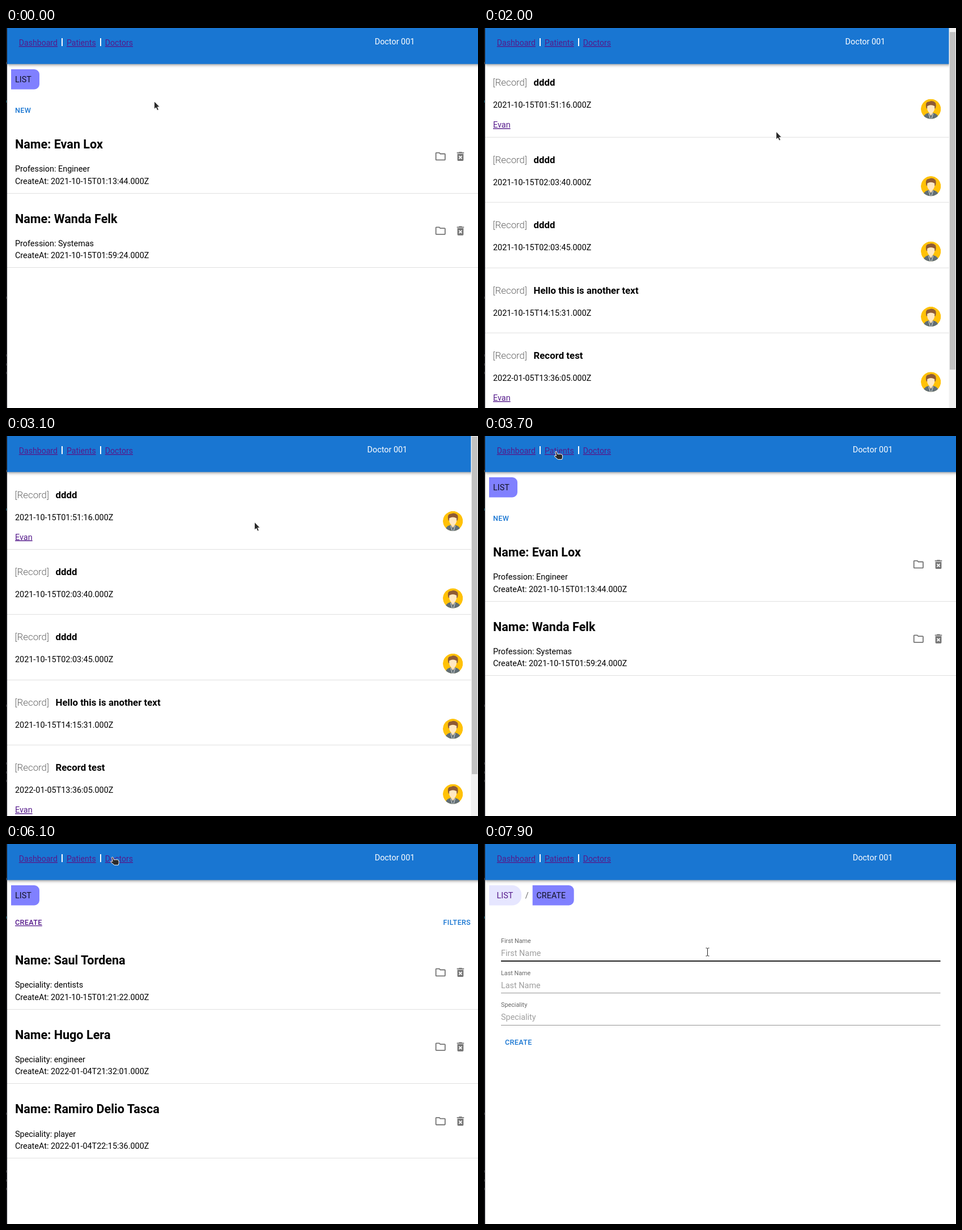
An HTML page for the animation above (8000 ms loop, 833 by 672 pixels).

```html
<!DOCTYPE html>
<html lang="en">
<head>
<meta charset="utf-8">
<title>Clinic admin</title>
<style>
  html, body { margin: 0; width: 100%; height: 100%; overflow: hidden; background: #fff; }
  svg { display: block; width: 833px; height: 672px; }
  text { font: 14.4px Roboto, sans-serif; white-space: pre; }
  .nav { font-size: 14.1px; fill: #551a8b; text-decoration: underline; }
  .link { fill: #551a8b; text-decoration: underline; }
  .crumb { fill: #551a8b; }
  .slash { fill: rgba(0,0,0,.6); }
  .user { fill: #fff; }
  .h2 { font-size: 21.6px; font-weight: 700; }
  .h3 { font-size: 16.85px; font-weight: 700; }
  .tag { font-size: 16.85px; font-weight: 300; fill: #666; }
  .btn { font-size: 12.6px; font-weight: 500; letter-spacing: .02857em; fill: #1976d2; }
  .visited { fill: #551a8b; text-decoration: underline; }
  .label { font-size: 10.8px; fill: rgba(0,0,0,.6); }
  .hint { fill: rgba(0,0,0,.38); }
  .chip { fill: rgba(0,0,0,.87); }
  .icon { fill: rgba(0,0,0,.54); }
  .bar { fill: #1976d2; filter: drop-shadow(0 2px 2px rgba(0,0,0,.28)) drop-shadow(0 1px 3px rgba(0,0,0,.14)); }
  .cursor path { fill: #2a2a2a; stroke: #fff; stroke-width: 1; stroke-linejoin: round; }
  .cursor .halo { stroke-width: 3; stroke-opacity: .6; }
  .cursor .beam { fill: none; stroke: #222; }
</style>
</head>
<body>
<svg id="stage" viewBox="0 0 833 672"></svg>
<script>
const text = (x, y, s, cls = '', id = '') => `<text x="${x}" y="${y}" class="${cls}" id="${id}">${s}</text>`;
const rect = (x, y, w, h, fill, more = '') =>
  `<rect x="${x}" y="${y}" width="${w}" height="${h}" fill="${fill}" ${more}/>`;
const rule = y => rect(2, y, 831, 1, '#e0e0e0');
const group = (id, body) => `<g id="${id}">${body}</g>`;

// Chip with square left corners and rounded right ones
const chip = (x, w, r, fill) =>
  `<path fill="${fill}" d="M${x} 73h${w - r}a${r} ${r} 0 0 1 ${r} ${r}v${35.5 - 2 * r}a${r} ${r} 0 0 1 ${-r} ${r}h${r - w}z"/>`;

const FOLDER = 'M9.17 6l2 2H20v10H4V6h5.17M10 4H4c-1.1 0-2 .9-2 2v12c0 1.1.9 2 2 2h16c1.1 0 2-.9 2-2V8c0-1.1-.9-2-2-2h-8l-2-2z';
const TRASH = 'M6 19c0 1.1.9 2 2 2h8c1.1 0 2-.9 2-2V7H6v12zm2.46-7.12l1.41-1.41L12 12.59l2.12-2.12 1.41 1.41L13.41 14l2.12 2.12-1.41 1.41L12 15.41l-2.12 2.12-1.41-1.41L10.59 14l-2.13-2.12zM15.5 4l-1-1h-5l-1 1H5v2h14V4z';
const icon = (x, y, d) => `<path class="icon" transform="translate(${x} ${y}) scale(.9)" d="${d}"/>`;

const person = ([name, job, date], i) => {
  const y = 161 + i * 131.6;
  return text(16, y + 52, 'Name: ' + name, 'h2') + text(16, y + 93.3, job) +
    text(16, y + 114.7, 'CreateAt: ' + date) +
    icon(756, y + 55.2, FOLDER) + icon(791.2, y + 55.2, TRASH) + rule(Math.floor(y + 131));
};

const listChip = chip(9, 50, 9, '#8080ff') + text(16, 95.5, 'LIST', 'chip');

const patients = listChip + text(16, 150, 'NEW', 'btn') + [
  ['Evan Lox', 'Profession: Engineer', '2021-10-15T01:13:44.000Z'],
  ['Wanda Felk', 'Profession: Systemas', '2021-10-15T01:59:24.000Z']
].map(person).join('');

const doctors = listChip + text(16, 143, 'CREATE', 'btn visited') + text(771.5, 143, 'FILTERS', 'btn') + [
  ['Saul Tordena', 'Speciality: dentists', '2021-10-15T01:21:22.000Z'],
  ['Hugo Lera', 'Speciality: engineer', '2022-01-04T21:32:01.000Z'],
  ['Ramiro Delio Tasca', 'Speciality: player', '2022-01-04T22:15:36.000Z']
].map(person).join('');

const avatar = y => `<g transform="translate(788.7 ${y})" clip-path="url(#disc)">
  <circle r="17.7" fill="#ffc107"/>
  <path fill="#616e75" d="M-14 18Q-13 9-5 7H5Q13 9 14 18z"/>
  <path fill="#ffe0b2" d="M-3 4H3V8L0 12-3 8z"/>
  <path fill="#8d5a35" d="M-8-1Q-11-13-3-13 3-16 8-11 10-7 8-1z"/>
  <path fill="#ffe8c2" d="M-6.5-5Q0-9 6.5-5V0Q5 7 0 8-5 7-6.5 0z"/>
  <path stroke="#fff" stroke-width=".8" fill="none" d="M-4 8L-1 18M4 8L1 18"/></g>`;

let nextTop = 64.5;
const records = [
  ['dddd', '2021-10-15T01:51:16.000Z', true],
  ['dddd', '2021-10-15T02:03:40.000Z'],
  ['dddd', '2021-10-15T02:03:45.000Z'],
  ['Hello this is another text', '2021-10-15T14:15:31.000Z'],
  ['Record test', '2022-01-05T13:36:05.000Z', true],
  ['Record test 01', '2022-01-05T13:40:12.000Z']
].map(([title, date, linked]) => {
  const y = nextTop;
  nextTop += linked ? 136.5 : 115.4;
  return text(15.5, y + 45, '[Record]', 'tag') + text(87.5, y + 45, title, 'h3') +
    text(16, y + 84, date) + (linked ? text(16, y + 119, 'Evan', 'link') : '') +
    avatar(y + 86) + rule(Math.round(nextTop - 1));
}).join('');

const form = chip(9, 57, 16, '#e6e6ff') + text(22.5, 95.5, 'LIST', 'crumb') + text(72.8, 95.5, '/', 'slash') +
  chip(85.7, 73, 9, '#8080ff') + text(92.5, 95.5, 'CREATE', 'chip') +
  ['First Name', 'Last Name', 'Speciality'].map((s, i) => {
    const y = 171 + i * 56.5;
    return text(30, y + 4, s, 'label') + text(30, y + 27, s, 'hint') +
      rect(30, Math.floor(y + 36), 775.5, 1, '#949494');
  }).join('') + rect(30, 206, 775.5, 2, '#212121', 'id="focus"') + text(37, 355, 'CREATE', 'btn');

const specks = [60, 128, 475, 577, 593, 608]
  .map((y, i) => rect(0, y, 1, 4, i == 1 ? '#2a7f95' : '#55555c')).join('');

document.getElementById('stage').innerHTML =
  '<clipPath id="disc"><circle r="17.7"/></clipPath>' + rect(0, 0, 833, 672, '#fff') +
  group('patients', patients) + group('records', records) + group('doctors', doctors) + group('form', form) +
  rect(2, -8, 840, 71.7, '#1976d2', 'class="bar"') +
  text(22.8, 31, 'Dashboard', 'nav') + text(107, 31, 'Patients', 'nav') +
  text(174.8, 31, 'Doctors', 'nav', 'docLink') +
  rect(98, 18, 2, 14, '#fff') + rect(166, 18, 2, 14, '#fff') +
  text(650.7, 29, 'Doctor 001', 'user', 'user') +
  group('scroll', rect(820.5, 0, 13, 672, '#f1f1f1') + rect(822, 0, 10, 597, '#c1c1c1', 'id="thumb"')) +
  rect(0, 0, 2, 672, '#18181c') + specks +
  `<g id="cursor" class="cursor">
    <path id="arrow" d="M0 0V14.2L3.2 11.3 5.4 16.2 8 15.1 5.8 10.3H10z"/>
    <path id="hand" d="M-1.2 1Q0-.6 1.4 1L2.6 5H9Q11.6 5.6 11.6 8V11L10.6 14.4H3.6L-2.2 9.6Q-3.4 7.4-1 7.5L.5 8.2z"/>
    <g id="beam"><path class="halo" d="M-3-7H3M-3 7H3M0-7V7"/>
      <path class="beam" d="M-3-7H-1L0-6 1-7H3M-3 7H-1L0 6 1 7H3M0-6V6"/></g></g>`;

const el = id => document.getElementById(id);
const show = (id, on) => { el(id).style.display = on ? '' : 'none'; };

// Eased track through [time, ...values] keys
function track(keys, t) {
  const i = keys.findIndex(k => k[0] > t);
  if (i < 0) return keys[keys.length - 1].slice(1);
  if (i == 0) return keys[0].slice(1);
  const a = keys[i - 1], b = keys[i], p = (t - a[0]) / (b[0] - a[0]), e = p * p * (3 - 2 * p);
  return a.slice(1).map((v, j) => v + (b[j + 1] - v) * e);
}

const POINTER = [
  [100, 261.5, 129.5], [900, 61, 20.5], [1300, 61, 20.5], [1900, 515.5, 183],
  [2900, 515.5, 183], [3600, 127, 27], [3800, 127, 27], [4500, 158, 194], [4600, 154.5, 187],
  [4700, 154.5, 187], [5300, 192, 21.5], [5400, 192, 21.5], [6300, 187, 23],
  [7000, 98.5, 95.5], [7200, 22, 131.5], [7300, 22, 131.5], [7900, 394.5, 191]
];
const SCROLL = [[1900, 0], [2400, 70], [2700, 70], [3100, 0]];
const PAGES = [[0, 'patients'], [1100, ''], [1300, 'records'], [3700, 'patients'], [5500, 'doctors'], [7300, 'form']];

function draw(now) {
  const t = Math.floor(now % 8000 / 100) * 100;
  const page = PAGES.filter(p => p[0] <= t).pop()[1];
  const [x, y] = track(POINTER, t), [s] = track(SCROLL, t);

  for (const id of ['patients', 'records', 'doctors', 'form']) show(id, id == page);
  show('scroll', page == 'records');
  el('user').setAttribute('x', page == 'records' ? 637.5 : 650.7);
  el('records').setAttribute('transform', `translate(0 ${-s})`);
  el('thumb').setAttribute('y', 1 + s * .85);
  el('docLink').style.fill = t >= 5300 && t < 5500 ? '#d32f10' : '';

  const onNav = y > 17 && y < 35 && (x > 23 && x < 91 || x > 107 && x < 159 || x > 175 && x < 224);
  const onCreate = page == 'doctors' && y > 130 && y < 147 && x > 15 && x < 63;
  const onField = page == 'form' && y > 178 && y < 207 && x > 30;
  show('hand', onNav || onCreate);
  show('beam', onField);
  show('arrow', !onNav && !onCreate && !onField);
  show('focus', onField);
  el('cursor').setAttribute('transform', `translate(${x} ${y})`);
}

const start = performance.now();
(function loop() {
  draw(performance.now() - start);
  requestAnimationFrame(loop);
})();
</script>
</body>
</html>
```
